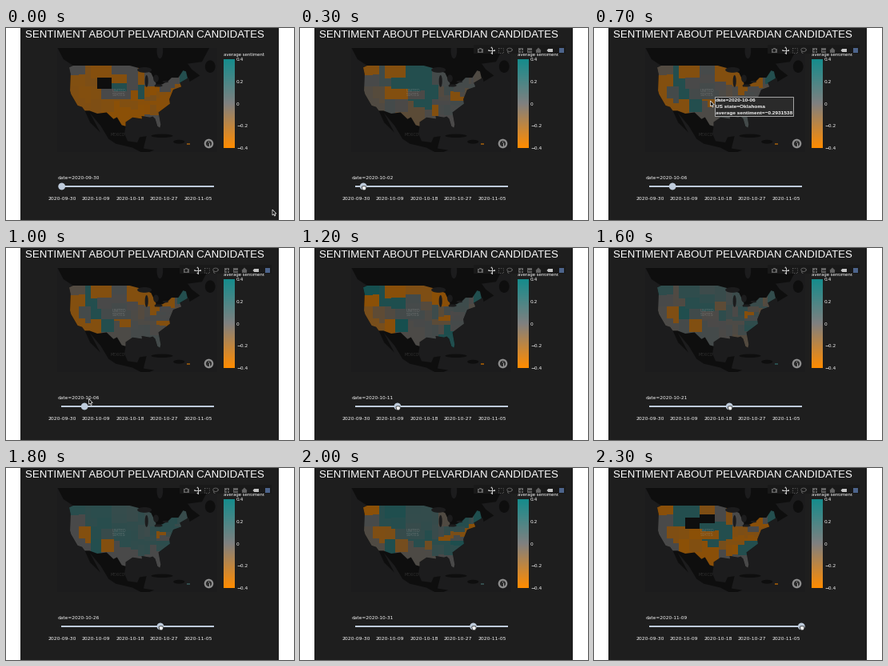
Animation of 360 by 240 pixels, one loop 2.4 s. Source, as a matplotlib script:

```python
import numpy as np
import matplotlib.pyplot as plt
from matplotlib.animation import FuncAnimation
from matplotlib.colors import LinearSegmentedColormap, to_rgb
from matplotlib.patches import Circle, Ellipse, Polygon, Rectangle

W, H, DPI = 360, 240, 100
FRAMES, STEP = 24, 100
PT = 72 / DPI
PAGE, OCEAN, LAND, PALE = "#1e1e1e", "#1c1c1d", "#0e0e0e", "#becbdb"
TITLE = "SENTIMENT ABOUT PELVARDIAN CANDIDATES"

# Columns of states: eastern edge, then names from north to south
# with the latitude that parts each from the next
COLUMNS = [
    (-120, "WA 45.8 OR 42 CA"),
    (-117, "WA 46 OR 42 NV 37.5 CA"),
    (-114.3, "ID 42 NV 35.6 CA"),
    (-111, "MT 44.8 ID 42 UT 37 AZ"),
    (-109, "MT 45 WY 41 UT 37 AZ"),
    (-104, "MT 45 WY 41 CO 37 NM 32 TX"),
    (-103, "ND 46 SD 43 NE 41 CO 37 NM 32 TX"),
    (-100, "ND 46 SD 43 NE 40 KS 37 OK 36.5 TX"),
    (-96.5, "ND 46 SD 43 NE 40 KS 37 OK 34 TX"),
    (-94.5, "MN 43.5 IA 40.5 KS 37 OK 33.8 TX"),
    (-91, "MN 43.5 IA 40.5 MO 36.5 AR 33 LA"),
    (-88.2, "WI 42.5 IL 37 TN 35 MS 30.2 LA"),
    (-85.2, "MI 41.8 IN 38 KY 36.6 TN 35 AL 30.8 FL"),
    (-82.3, "MI 41.8 OH 38.5 KY 36.6 TN 35 GA 30.6 FL"),
    (-80.5, "OH 40 WV 37.5 VA 36.6 NC 35 SC 32.3 GA 30.6 FL"),
    (-77.5, "NY 42 PA 39.8 WV 38.7 VA 36.6 NC 34.5 SC 31 FL"),
    (-75, "NY 42 PA 39.8 MD 38 VA 36.6 NC"),
    (-73.3, "NY 41.2 NJ"),
    (-72, "VT 42.8 MA 42 CT"),
    (-70.8, "NH 42.8 MA 42 CT"),
    (-66.5, "ME 43 MA"),
]

WEST_COAST = [(-117.1, 32.5), (-118.4, 34), (-120.6, 34.6), (-123.8, 39),
              (-124.3, 40.4), (-124, 46.2), (-124.7, 48.4), (-122.8, 49)]
BORDER = [(-95.2, 49), (-89.6, 48), (-84.8, 46.6), (-82.4, 43), (-82.9, 41.7), (-79, 42.8),
          (-76.2, 44), (-74.8, 45), (-71.5, 45), (-69.2, 47.4), (-67.8, 47.1)]
EAST_COAST = [(-67, 44.8), (-70.8, 43.2), (-70, 41.8), (-74, 40.7), (-75.9, 37.1),
              (-75.6, 35.3), (-81.2, 31.8), (-80.1, 26.6), (-80.5, 25.2), (-81.7, 25.9),
              (-82.8, 29.1), (-84, 30.1), (-85.3, 29.7), (-89.4, 30.3), (-89.2, 29.1),
              (-93.8, 29.7), (-97.2, 27.7), (-97.2, 25.9)]
RIO = [(-99.1, 26.4), (-101.4, 29.8), (-103.1, 29), (-106.5, 31.8), (-111, 31.3), (-114.8, 32.5)]
CANADA = [(-127.5, 51), (-131, 55), (-55.8, 55), (-60, 50.2), (-67, 49.6),
          (-65, 47.8), (-61, 45.7), (-66, 43.6), (-66.5, 45)]
MEXICO = [(-97.8, 22.5), (-96.2, 19.2), (-91.5, 18.6), (-90.4, 21), (-87, 21.5),
          (-88.5, 15.8), (-83.3, 15), (-88, 13.2), (-94, 16.2), (-102, 18), (-105.5, 20.2),
          (-109.3, 26), (-114.7, 31.7), (-109.5, 23.1), (-114.5, 27.5)]
# Longitude, latitude, width, height in degrees
LAKES = [(-88, 47.6, 7, 1.8), (-87, 43.8, 1.6, 4.2), (-82.4, 44.7, 2.6, 2.6),
         (-81.2, 42.2, 4, .9), (-77.8, 43.6, 3, .7), (-80.5, 53.5, 3, 4.5)]
ISLANDS = [(-79.5, 21.6, 10.5, 1.6), (-71.2, 18.9, 5.5, 1.8), (-56, 48.7, 5, 4)]

# Known days: the usual level, then the states that stand out
LOW, MID, HIGH, NONE = -.35, 0, .28, np.nan
MOODS = {
    0: (LOW, {MID: "WA ND CO KS MN NY PA MI FL VT NH IA", HIGH: "NE IL ME", NONE: "WY"}),
    2: (MID, {LOW: "WA MT UT CO MS VA WV PR", HIGH: "ND MN WY NE IA MO OK IL SD AR"}),
    6: (MID, {LOW: "OR CA MT AZ OK MN WI MI NY OH NC PR", HIGH: "ID UT NM ME NH"}),
    16: (MID, {LOW: "ND NM OR WV KY CA PR", HIGH: "WA WY FL GA SC MN"}),
    26: (.18, {LOW: "NV NM WV", MID: "OR VA CA TX FL LA GA"}),
    40: (LOW, {MID: "OR CA MN FL PA MI VT LA NH", HIGH: "ID MT NE OK MO IA IL NC SC GA ME",
               NONE: "WY SD"}),
}
SCALE = LinearSegmentedColormap.from_list("mood", ["#ff8c00", "#808080", "#168c8c"])


def project(lon, lat):
    merc = np.degrees(np.log(np.tan(np.pi / 4 + np.radians(lat) / 2)))
    return 79 + (lon + 124.7) * 2.565, 47 + (56.37 - merc) * 2.565


def known(day):
    base, groups = MOODS[day]
    vals = base + np.random.default_rng(100 + day).normal(0, .04, len(NAMES))
    for level, names in groups.items():
        vals[[n in names.split() for n in NAMES]] = level
    return vals


def sentiment(day):
    """Known days as listed; between them states switch over one by one."""
    if day in MOODS:
        return known(day)
    lo = max(d for d in MOODS if d < day)
    hi = min(d for d in MOODS if d > day)
    rng = np.random.default_rng(day)
    late = rng.random(len(NAMES)) < (day - lo) / (hi - lo)
    return np.where(late, known(hi), known(lo)) + rng.normal(0, .05, len(NAMES))


def fill(value):
    if np.isnan(value):
        return LAND
    return .52 * np.array(SCALE((value + .4) / .8)[:3]) + .48 * np.array(to_rgb(LAND))


fig = plt.figure(figsize=(W / DPI, H / DPI), dpi=DPI, facecolor="white")
ax = fig.add_axes([0, 0, 1, 1])


def text(x, y, s, size, color="#f4f4f4", font="DejaVu Sans", **kw):
    """Place text with its capitals centred on y."""
    return ax.text(x, y + .36 * size, s, fontsize=size * PT, color=color,
                   family=font, va="baseline", **kw)


def add(patch, color, z, clip=None, **kw):
    patch.set(**{"fc": color, "lw": 0, "zorder": z, **kw})
    ax.add_patch(patch)
    if clip:
        patch.set_clip_path(clip)
    return patch


def rect(x0, y0, x1, y1, color, z=1, **kw):
    return add(Rectangle((x0, y0), x1 - x0, y1 - y0), color, z, **kw)


def disc(x, y, r, color, z, **kw):
    return add(Circle((x, y), r), color, z, **kw)


def land(points, clip):
    return add(Polygon(np.column_stack(project(*np.array(points).T))), LAND, 2, clip)


def oval(lon, lat, w, h, color, z, clip):
    size = 2.565 * w, 2.565 * h / np.cos(np.radians(lat))
    return add(Ellipse(project(lon, lat), *size), color, z, clip)


def line(xs, ys, color, lw=.9, z=8):
    return ax.plot(xs, ys, color=color, lw=lw * PT, zorder=z)[0]


def slider_x(day):
    return 69.7 + 4.74 * day


def date(day):
    return f"date={np.datetime64('2020-09-30') + day}"


# Page and map
rect(18, 0, 341, H, PAGE, 0)
frame = rect(64, 25, 264, 155, OCEAN)
land(WEST_COAST + CANADA + EAST_COAST + MEXICO, frame)
usa = land(WEST_COAST + BORDER + EAST_COAST + RIO, frame)
for spot in ISLANDS:
    oval(*spot, LAND, 2, frame)
for spot in LAKES:
    oval(*spot, OCEAN, 4, frame)

areas = [("PR", rect(226, 143.6, 230.4, 145.6, LAND, 4))]
west = -125
for east, column in COLUMNS:
    north, words = 49.5, column.split() + ["24"]
    for name, edge in zip(words[::2], words[1::2]):
        south = float(edge)
        area = rect(*project(west, north), *project(east, south), LAND, 3,
                    clip=usa, antialiased=False)
        areas.append((name, area))
        north = south
    west = east
NAMES = sorted({name for name, _ in areas})

for y, s in ((78, "UNITED"), (83.3, "STATES")):
    text(141, y, s, 4.6, "#a0a0a0", ha="center", alpha=.4, zorder=5)
text(140, 133, "MEXICO", 4.6, "#303030", ha="center", zorder=5)
disc(253.5, 144.5, 5.8, "#8f8f8f", 5)
disc(253.5, 144.5, 3.6, "#2a2a2a", 5)
line([253.5, 253.5], [144.2, 146.8], "#a0a0a0", 1.1)
disc(253.5, 142.6, .7, "#a0a0a0", 6)

# Title, colour bar, slider
text(24, 7.7, TITLE, 13.25, "white", "Liberation Sans")
text(272, 33, "average sentiment", 5.4)
ax.imshow(np.linspace(1, 0, 222)[:, None], cmap=SCALE, vmin=0, vmax=1,
          extent=(272, 286, 150, 39), aspect="auto", zorder=2)
for i, s in enumerate(("0.4", "0.2", "0", "−0.2", "−0.4")):
    text(288, 39 + 27.75 * i, s, 5.9)
rect(69, 197, 260, 199, PALE, 3)
for i in range(5):
    text(70 + 42.6 * i, 213, date(9 * i)[5:], 6.1, ha="center")
handle = disc(69, 198, 4.4, PALE, 5)
stamp = text(65, 187, "", 5.85)

# Toolbar
BACK, DIM, LIT = "#191919", "#626262", "#c4c4c4"
bar = [
    rect(216.5, 21, 332, 32, BACK, 7),
    rect(221.5, 25.5, 229, 31, DIM, 8), rect(223.5, 24.5, 227, 26, DIM, 8),
    disc(225.2, 28.2, 1.7, BACK, 9),
    line([236, 243], [28, 28], LIT, 1), line([239.5, 239.5], [24.5, 31.5], LIT, 1),
    rect(247.5, 25, 253.5, 31, "none", 8, ec=DIM, lw=.7, ls=":"),
    rect(323.6, 24.6, 330.4, 31.4, "#4c648c", 8),
]
for x in (276.2, 287.2):
    bar += [rect(x - 3.2, 24.8, x + 3.2, 31.2, DIM, 8),
            line([x - 1.9, x + 1.9], [28, 28], BACK, 1, 9)]
bar.append(line([276.2, 276.2], [26.1, 29.9], BACK, 1, 9))
bar += [disc(239.5 + 3.5 * dx, 28 + 3.5 * dy, .9, LIT, 8)
        for dx, dy in ((1, 0), (-1, 0), (0, 1), (0, -1))]
turn = np.linspace(0, 2 * np.pi, 30)
bar += [line(262 + 3.2 * np.cos(turn), 27.3 + 2.2 * np.sin(turn), DIM),
        line([260, 259.5, 261], [29, 30.5, 31.5], DIM),
        add(Polygon([(294.3, 28.2), (298, 24.5), (301.7, 28.2)]), DIM, 8),
        rect(295.3, 28, 300.7, 31.3, DIM, 8),
        add(Polygon([(308.5, 28), (310.5, 25.8), (310.5, 30.2)]), LIT, 8),
        rect(310.4, 25.8, 316, 30.2, LIT, 8)]

# Hover label
tip = [rect(150.5, 85.5, 248.5, 109.5, "#2a2a2a", 10, ec="#a8a8a8", lw=.7),
       add(Polygon([(150.6, 94), (147, 97), (150.6, 100)]), "#2a2a2a", 10)]
for i, s in enumerate((date(6), "US state=Oklahoma", "average sentiment=−0.2931538")):
    tip.append(text(152, 90 + 7.7 * i, s, 6.45, "#f4f4f4", "Liberation Sans",
                    weight="bold", zorder=11))

# Pointers
ARROW = np.array([(0, 0), (0, 7), (1.6, 5.6), (2.7, 8), (3.8, 7.5), (2.8, 5.2), (4.8, 5)])
HAND = np.array([(-2.5, 0), (-1.5, -1.2), (2.3, -1.2), (3.2, 1), (2, 3.8), (-1.2, 3.8)])
pointer = add(Polygon(ARROW), "#101010", 12, lw=.5)

ax.set(xlim=(0, W), ylim=(H, 0))
ax.axis("off")


def draw(f):
    day = int(np.interp(f, [1, 3, 5, 10, 14, 18, 23], [0, 2, 6, 6, 16, 26, 40]))
    mood = dict(zip(NAMES, sentiment(day)))
    for name, area in areas:
        area.set_facecolor(fill(mood[name]))

    x = slider_x(day)
    handle.center = (x, 198)
    stamp.set_text(date(day))
    for part in bar:
        part.set_visible(f > 0)
    for part in tip:
        part.set_visible(f in (7, 8))

    if 2 <= f <= 5 or f >= 11:
        pointer.set_xy(HAND + (x + .5, 199))
        pointer.set(fc="#f0f0f0", ec="#181818")
    else:
        keys = [0, 2, 5, 7, 8, 10]
        px = np.interp(f, keys, [333, 74, 98, 145.5, 145.5, 103.5])
        py = np.interp(f, keys, [227, 198, 198, 91, 91, 188.5])
        pointer.set_xy(ARROW + (px, py))
        pointer.set(fc="#101010", ec="#f0f0f0")
    return []


anim = FuncAnimation(fig, draw, frames=FRAMES, interval=STEP, repeat=True,
                     repeat_delay=0, init_func=lambda: draw(0))
plt.show()
```
